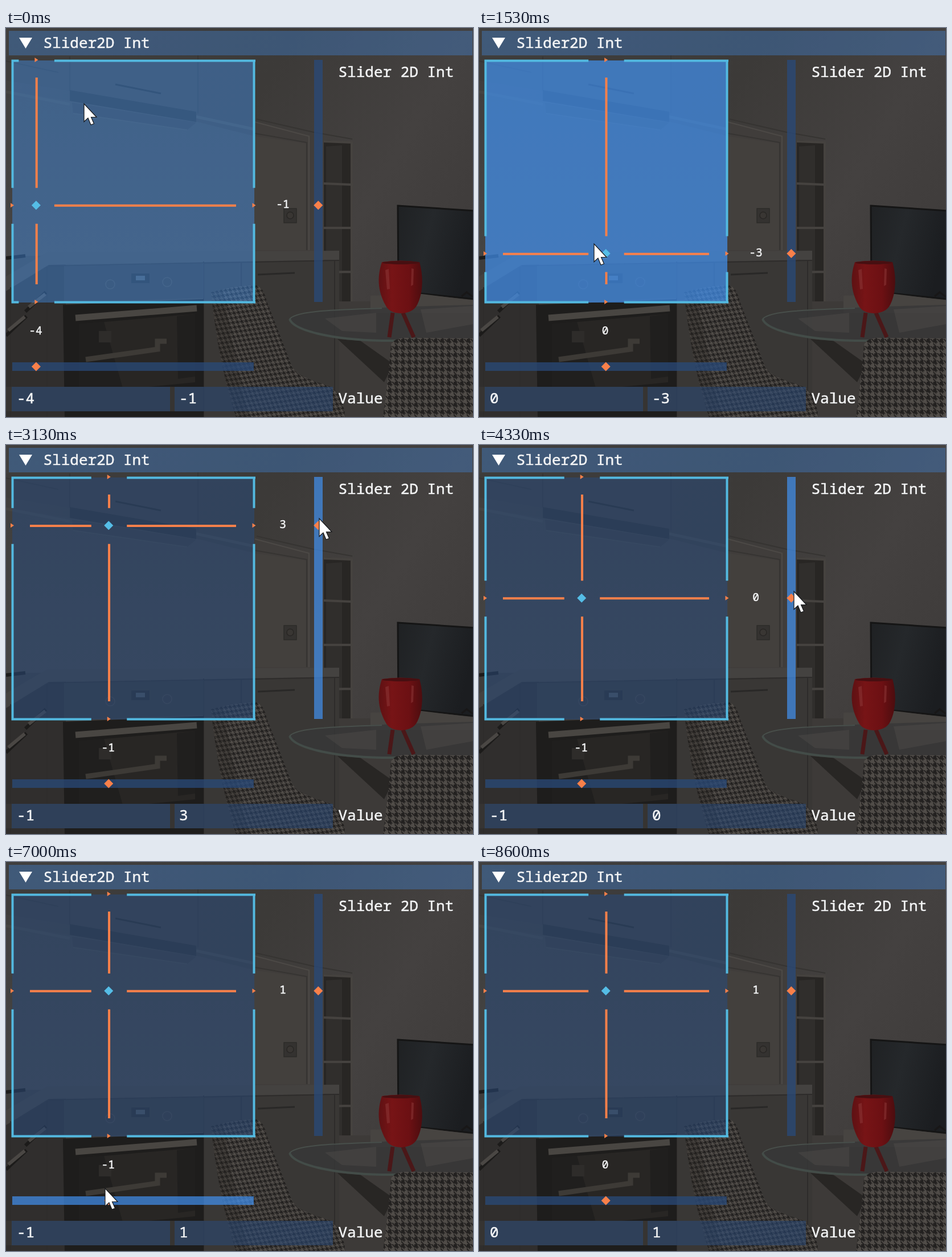
Animation, 820 px wide and 683 px high, one loop 9400 ms. Source, as an HTML page:

```html
<!DOCTYPE html>
<html lang="en">
<head>
<meta charset="utf-8">
<title>Slider2D Int</title>
<style>
  html, body { margin: 0; width: 100%; height: 100%; overflow: hidden; background: #3d3b39; }
  svg { display: block; width: 100%; height: 100%; }
  text {
    font: 500 26px "Noto Sans Mono", "DejaVu Sans Mono", monospace;
    fill: #f4f5f6; stroke: #f4f5f6; stroke-width: .5; white-space: pre;
  }
  .small { font-size: 19.5px; text-anchor: middle; }
  .frame { fill: rgba(41, 74, 122, .54); }
  .bar { fill: rgba(41, 74, 122, .75); }
  .frame.hover { fill: rgba(66, 150, 250, .4); }
  .frame.active { fill: rgba(66, 150, 250, .67); }
  .mark { fill: #f9804a; }
  .ln { fill: none; }
</style>
</head>
<body>
<svg viewBox="0 0 820 683" preserveAspectRatio="none">
  <defs>
    <linearGradient id="wall" x2="1" y2=".5">
      <stop offset="0" stop-color="#403f3e"/><stop offset=".5" stop-color="#3c3a38"/>
      <stop offset=".8" stop-color="#444140"/><stop offset="1" stop-color="#3f3c3b"/>
    </linearGradient>
    <linearGradient id="splash" y2="1" x2="0">
      <stop offset="0" stop-color="#403f3e"/><stop offset="1" stop-color="#454443"/>
    </linearGradient>
    <linearGradient id="tv" x2="1" y2=".3">
      <stop offset="0" stop-color="#1f2123"/><stop offset=".45" stop-color="#25282b"/>
      <stop offset="1" stop-color="#1b1d20"/>
    </linearGradient>
    <linearGradient id="red" x2="1">
      <stop offset="0" stop-color="#5e1113"/><stop offset=".3" stop-color="#771416"/>
      <stop offset=".7" stop-color="#6c1013"/><stop offset="1" stop-color="#4c0d0f"/>
    </linearGradient>
    <pattern id="tooth" width="10" height="10" patternUnits="userSpaceOnUse">
      <path fill="#504c48" d="M0 0h10v10H0z"/>
      <path fill="#232120" d="M0 0h5v5H0zM5 0l5 5V2.5L7.500 0zM5 2.500V5h2.500zM0 5l5 5H2.500L0 7.500zM2.500 5H5v2.500z"/>
    </pattern>
    <pattern id="toothR" href="#tooth" patternTransform="translate(671 546) scale(1.150 1.250)"/>
    <pattern id="toothL" href="#tooth" patternTransform="translate(360 462) skewX(14) rotate(-7) scale(.8)"/>
  </defs>

  <!-- dimmed kitchen -->
  <path fill="url(#wall)" d="M0 0h820v683H0z"/>
  <path fill="url(#splash)" d="M0 110L337 165 437 190V400H0z"/>
  <path fill="#3d3c3b" d="M0 50H337V148L112 110 0 92z"/>
  <path class="ln" stroke="#363534" stroke-width="2" d="M112 50V110M337 48V150M0 58L92 78"/>
  <path class="ln" stroke="#464543" stroke-width="5" d="M0 112L112 134M330 155L437 178"/>
  <path fill="#2f2e2d" d="M112 109L334 147V165L112 128z"/>
  <path fill="#3a3938" d="M116 131L334 166 318 179 118 150z"/>
  <path class="ln" stroke="#464543" stroke-width="2" d="M118 150L318 179"/>
  <path class="ln" stroke="#2a2928" stroke-width="3" d="M192 99L272 115"/>

  <path fill="#403d3b" d="M437 166L540 189V392H437z"/>
  <path fill="#43403d" d="M437 190L529 203V390H437z"/>
  <path class="ln" stroke="#4c4946" stroke-width="2" d="M437 165L532 190V390"/>
  <path class="ln" stroke="#363432" stroke-width="2" d="M437 185L528 201V390M440 160L540 183 608 195"/>
  <path fill="#282624" d="M558 197L606 200V490H558z"/>
  <path fill="#302e2c" d="M562 208L590 206V484H562z"/>
  <path class="ln" stroke="#45423f" stroke-width="4" d="M558 199L607 201V492M558 273l48 2M558 351h48M558 429l48-1"/>
  <path fill="#343230" stroke="#2d2b29" stroke-width="1.500" d="M488 317h22v25h-22z"/>
  <circle cx="499" cy="329" r="6" fill="#393633" stroke="#292725" stroke-width="1.500"/>

  <path fill="#393735" d="M347 408H585V683H347z"/>
  <path fill="#302e2d" d="M0 436L75 414H105V683H0z"/>
  <path fill="#444240" d="M0 436L72 394 585 391V407L75 416 0 462z"/>
  <path class="ln" stroke="#2e2c2b" stroke-width="2" d="M75 418L585 408M347 410V683M413 412V560M577 408V683M8 455V683M72 420V683"/>
  <path fill="#373635" d="M102 418L347 413V474L102 482z"/>
  <path fill="#292929" d="M220 431h32v17h-32z"/>
  <path fill="#4c5358" d="M228 435h16v8h-16z"/>
  <g fill="#373534" stroke="#474543" stroke-width="1.500">
    <circle cx="183" cy="450" r="8"/><circle cx="283" cy="446" r="8"/>
  </g>
  <path class="ln" stroke="#292827" stroke-width="3" d="M442 433L507 430"/>
  <path fill="#1e1d1c" d="M100 486L347 476V683H103z"/>
  <path fill="#282624" d="M128 520L332 502V622L128 642z"/>
  <path fill="#201f1e" d="M128 520L172 516 205 632 128 640zM300 506L332 502V612L302 616z"/>
  <path fill="#2e2c2a" d="M163 532h22v20h-22z"/>
  <path class="ln" stroke="#3d3a36" stroke-width="9" d="M140 582L266 564V550h16"/>
  <path class="ln" stroke="#494642" stroke-width="11" d="M122 509L335 492"/>
  <path fill="#363432" d="M0 630H347V673H0z"/>
  <path class="ln" stroke="#1c1b1a" stroke-width="6" d="M0 404L34 400M0 540L36 506M34 498L70 464"/>
  <path class="ln" stroke="#4a4744" stroke-width="6" d="M4 531L33 507M40 490L69 467"/>

  <path fill="#3d3a38" d="M585 480H820V683H585z"/>
  <path fill="url(#tv)" stroke="#151515" stroke-width="3" d="M688 312L822 321V476L689 462z"/>
  <path class="ln" stroke="#181717" stroke-width="3" d="M800 471l9-7 11 8"/>
  <path fill="#474441" d="M640 470L730 467 820 478V500H640z"/>
  <path fill="#282624" d="M582 546L622 549 680 590 664 622z"/>
  <path fill="#383838" fill-opacity=".82" d="M498 512C510 495 650 490 820 486V548H660C570 546 505 530 498 512z"/>
  <path fill="#5a5855" fill-opacity=".3" d="M560 510L650 500V535L590 532zM728 494L820 488V520L738 535z"/>
  <path class="ln" stroke="#434c48" stroke-width="4" d="M498 511C505 531 570 547 660 549H690"/>
  <path class="ln" stroke="#484f4b" stroke-width="2" d="M498 511C510 496 580 495 660 492"/>
  <path class="ln" stroke="#4b1718" stroke-width="7" d="M679 500L673 543M697 500L716 543"/>
  <path fill="url(#red)" d="M660 411Q692 406 726 411C733 435 733 465 722 486Q715 500 693 501 672 500 666 486C652 460 652 435 660 411z"/>
  <ellipse cx="693" cy="412" rx="32" ry="3" fill="#470f11"/>
  <path fill="#8f3a3a" fill-opacity=".5" d="M666 425l6-2 2 35-5 1zM712 422l4 1-1 28-4 2z"/>

  <path fill="url(#toothL)" d="M360 464Q402 452 440 452 452 455 458 480L503 596Q512 612 560 626 590 634 596 683H404Q373 590 360 464z"/>
  <path fill="#25231f" fill-opacity=".3" d="M360 464L381 462Q400 570 425 683H404Q373 590 360 464z"/>
  <path fill="url(#toothR)" d="M676 556Q680 545 700 544L820 545V683H662Q672 610 676 556z"/>

  <!-- widgets -->
  <path fill="rgba(66,150,250,.31)" d="M5 5H819V48H5z"/>
  <path fill="#fff" d="M23 17H46L34.500 36z"/>
  <text x="65.500" y="35">Slider2D Int</text>
  <text x="583.500" y="86">Slider 2D Int</text>
  <text x="583.500" y="659">Value</text>
  <path class="frame" d="M10 630H288V673H10zM296 630H574V673H296z"/>
  <text id="inX" x="19" y="659"></text>
  <text id="inY" x="304" y="659"></text>
  <rect id="box" x="11" y="57" width="425" height="425"/>
  <rect id="v" x="541" y="56" width="15" height="425"/>
  <rect id="h" x="11" y="587" width="424" height="15"/>
  <path id="edge" class="ln" stroke="#53b9e0" stroke-width="4"/>
  <path id="cross" class="ln" stroke="#f9804a" stroke-width="4"/>
  <path id="marks" class="mark"/>
  <path id="dot" fill="#55bde6"/>
  <text id="labX" class="small" y="538"></text>
  <text id="labY" class="small" x="486"></text>
  <path id="cursor" fill="#fff" stroke="#16181b" stroke-width="1.200" d="M0 0V31.500L7 25 12 37 17.500 35 12.500 23.500H22z"/>
</svg>

<script>
const $ = id => document.getElementById(id);
const LOOP = 9400, TICK = 200 / 3;

// pointer path: tick, x, y
const path = [
  [0, 137, 133], [1, 135, 148], [8, 135, 148], [9, 137, 140], [12, 110, 62], [15, 260, 80],
  [18, 340, 200], [20, 300, 360], [23, 202, 379], [24, 190, 375], [26, 180, 350], [31, 180, 350],
  [32, 200, 345], [38, 480, 260], [41, 546, 240], [44, 548, 175], [47, 550, 129], [51, 575, 58],
  [56, 580, 200], [61, 560, 400], [65, 553, 257], [69, 562, 195], [72, 548, 226], [75, 548, 226],
  [76, 530, 260], [79, 380, 420], [82, 185, 575], [83, 162, 591], [84, 153, 594], [86, 153, 594],
  [91, 8, 590], [97, 424, 585], [101, 395, 580], [105, 174, 573], [109, 8, 585], [111, 8, 585],
  [122, 215, 592], [127, 215, 594], [128, 214, 609]
];
// first and last tick of each press
const drags = { box: [9, 27], v: [41, 72], h: [84, 126] };
const areas = { box: [11, 57, 436, 482], v: [541, 56, 556, 481], h: [11, 587, 435, 602] };
const STEP = 42.45, CX = 222.7, CY = 268.7;

function pointer(k) {
  const i = path.findIndex(p => p[0] > k);
  if (i < 0) return path[path.length - 1].slice(1);
  const [a, ax, ay] = path[i - 1], [b, bx, by] = path[i];
  const f = (k - a) / (b - a);
  return [ax + (bx - ax) * f, ay + (by - ay) * f];
}

const snap = d => Math.max(-5, Math.min(5, Math.round(d / STEP))) + 0;

// value held from the latest press on the pad or on its own slider
function value(k, axis, slider, start) {
  const drag = k >= drags[slider][0] ? drags[slider] : drags.box;
  if (k < drag[0]) return start;
  const p = pointer(Math.min(k, drag[1]));
  return axis ? snap(CY - p[1]) : snap(p[0] - CX);
}

const diamond = (x, y) => `M${x - 8} ${y}l8-8 8 8-8 8z`;
const arrow = (x, y) => `M${x - 2.5} ${y - 4}l6 4-6 4z`;
const hline = (a, b, y) => b > a ? `M${a} ${y}H${b}` : "";
const vline = (a, b, x) => b > a ? `M${x} ${a}V${b}` : "";

function draw(k) {
  const [px, py] = pointer(k);
  const vx = value(k, 0, "h", -4), vy = value(k, 1, "v", -1);
  const x = CX + vx * STEP, y = CY - vy * STEP;
  const l = x - 30.5, r = x + 32, t = y - 30.5, b = y + 32.5;

  const held = Object.keys(drags).find(n => k >= drags[n][0] && k <= drags[n][1]);
  for (const n in areas) {
    const [x0, y0, x1, y1] = areas[n];
    const over = !held && px >= x0 && px <= x1 && py >= y0 && py <= y1;
    const state = held === n ? " active" : over ? " hover" : "";
    $(n).setAttribute("class", "frame" + (n === "box" ? "" : " bar") + state);
  }

  const edge = [57.5, 481.5].map(e => hline(9.5, l, e) + hline(r, 438, e)).join("") +
    [11.5, 435.5].map(e => vline(55.5, t, e) + vline(b, 483.5, e)).join("");
  $("edge").setAttribute("d", edge);
  $("cross").setAttribute("d", hline(42, l, y + .6) + hline(r, 404, y + .6) +
    vline(87, t, x + .8) + vline(b, 450, x + .8));
  $("marks").setAttribute("d", arrow(10.5, y) + arrow(435, y) + arrow(x, 56) + arrow(x, 481) +
    diamond(548.3, y) + diamond(x, 594.5));
  $("dot").setAttribute("d", diamond(x, y));

  $("inX").textContent = $("labX").textContent = vx;
  $("inY").textContent = $("labY").textContent = vy;
  $("labX").setAttribute("x", x - 1);
  $("labY").setAttribute("y", y + 5);

  $("cursor").setAttribute("transform", `translate(${px} ${py})`);
  $("cursor").setAttribute("visibility", k < 129 ? "visible" : "hidden");
}

const begin = performance.now();
function loop() {
  const t = (performance.now() - begin) % LOOP;
  draw(Math.floor((t + 4) / TICK));
  requestAnimationFrame(loop);
}
draw(0);
requestAnimationFrame(loop);
</script>
</body>
</html>
```
